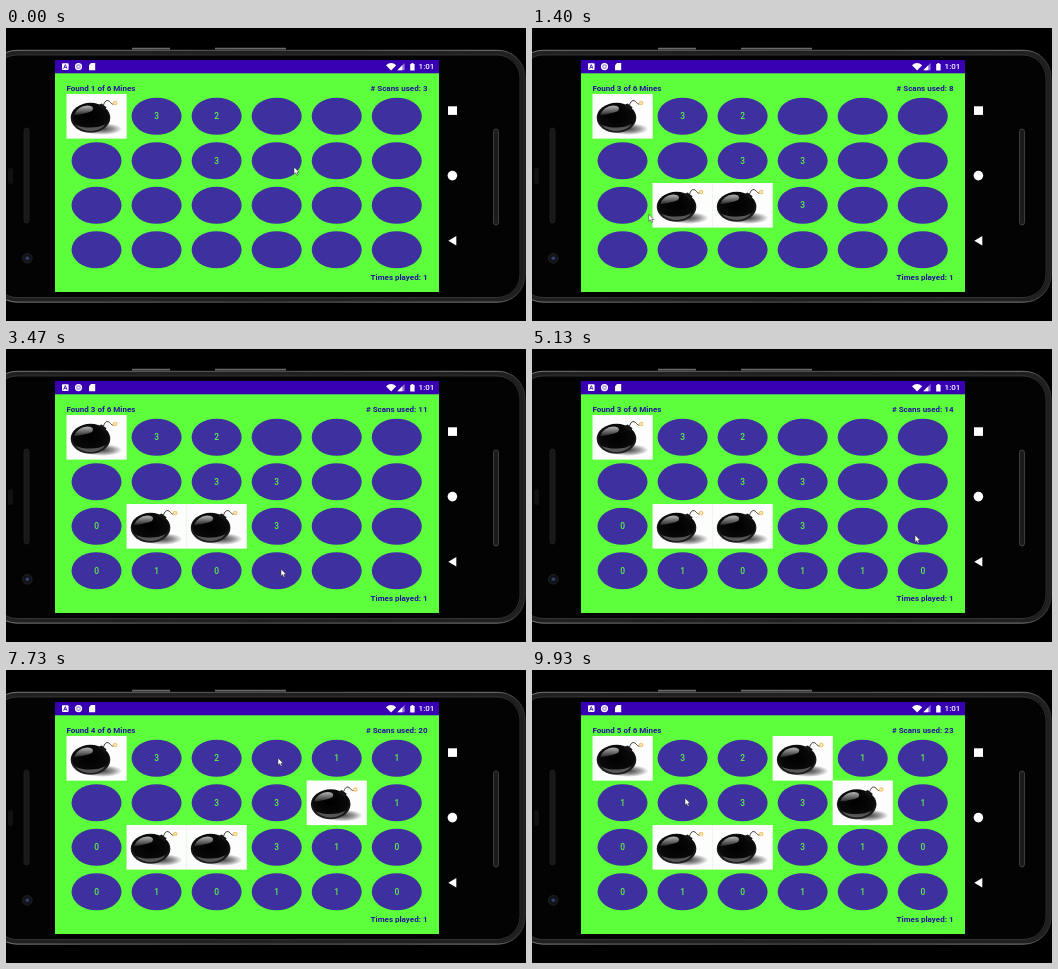
These frames come from a looping animation (520x293 px, 9.99 s). An HTML page:

```html
<!DOCTYPE html>
<html lang="en">
<head>
<meta charset="utf-8">
<title>Mine seeker</title>
<style>
  html, body { margin: 0; width: 100%; height: 100%; overflow: hidden; background: #000; }
  svg { display: block; width: 520px; height: 293px; }
  text { font-family: Roboto, sans-serif; font-size: 8px; }
  .label { font-weight: 700; fill: #26109c; }
  .count { font-weight: 500; font-size: 8.4px; fill: #5cf545; text-anchor: middle; }
  .end { text-anchor: end; }
</style>
</head>
<body>
<svg viewBox="0 0 520 293" xmlns="http://www.w3.org/2000/svg">
  <defs>
    <linearGradient id="rim">
      <stop offset="0" stop-color="#777"/>
      <stop offset=".5" stop-color="#555"/>
      <stop offset=".94" stop-color="#777"/>
      <stop offset="1" stop-color="#2a2a2a"/>
    </linearGradient>
    <radialGradient id="ball" cx=".5" cy=".45" r=".55">
      <stop offset="0" stop-color="#000"/>
      <stop offset=".8" stop-color="#0a0a0a"/>
      <stop offset="1" stop-color="#2a2a2a"/>
    </radialGradient>
    <linearGradient id="gloss" x1="0" y1="0" x2="0" y2="1">
      <stop offset="0" stop-color="#eee"/>
      <stop offset="1" stop-color="#333"/>
    </linearGradient>
    <radialGradient id="shade">
      <stop offset="0" stop-color="#444"/>
      <stop offset=".55" stop-color="#999"/>
      <stop offset="1" stop-color="#fff"/>
    </radialGradient>
    <g id="bomb">
      <rect width="60.2" height="44.6" fill="#fdfdfd"/>
      <ellipse cx="36" cy="35" rx="20" ry="6" fill="url(#shade)"/>
      <path d="M37 11C39 5 42 6 44 8.5S47 10 48 9" fill="none" stroke="#443c30" stroke-width="1"/>
      <circle cx="48.6" cy="9" r="2.3" fill="#f3c877"/>
      <circle cx="48.6" cy="9" r="1" fill="#fff3c0"/>
      <ellipse cx="24" cy="23.8" rx="19.8" ry="15" fill="url(#ball)"/>
      <path d="M31 11.5l4-2 5 3.8-2 3.5z" fill="#151515"/>
      <path d="M7.5 21Q11 12 21 11.5Q29 12 25.5 17Q18 20 7.5 21z" fill="url(#gloss)" opacity=".75"/>
      <path d="M9 31Q15 37 25 37Q35 36 39 30Q33 33.5 24 33.6Q15 33.5 9 31z" fill="#888" opacity=".6"/>
    </g>
  </defs>

  <rect width="520" height="293" fill="#000"/>
  <path d="M126 20.7h38M209 20.7h71" stroke="#6a6a6a" stroke-width="1.8"/>
  <g fill="none">
    <rect x="-14" y="24.5" width="531" height="247.5" rx="25" fill="#030303" stroke="#202020" stroke-width="5"/>
    <rect x="-16" y="22.3" width="535" height="251.8" rx="27" stroke="url(#rim)"/>
    <rect x="-12" y="27" width="526" height="242.5" rx="23" stroke="#3c3c3c" stroke-width=".8"/>
  </g>
  <rect x="2" y="140" width="5" height="16" rx="2" fill="#111"/>
  <rect x="18" y="100" width="5" height="95" rx="2.5" fill="#181818" stroke="#242424" stroke-width=".8"/>
  <rect x="487.5" y="101" width="5" height="96" rx="2.5" fill="#1c1c1c" stroke="#4a4a4a" stroke-width=".8"/>
  <circle cx="21.3" cy="230.3" r="4.8" fill="#11131a" stroke="#222"/>
  <circle cx="21.3" cy="230.3" r="1.8" fill="#34406e"/>

  <g fill="#fff">
    <rect x="442" y="78.3" width="9" height="8.6"/>
    <circle cx="446.4" cy="147.6" r="4.8"/>
    <path d="M442.3 212.8l8-4.7v9.4z"/>
  </g>

  <rect x="49" y="32" width="384" height="232" fill="#5dff3c"/>
  <rect x="49" y="32" width="384" height="13.3" fill="#3700b3"/>
  <g fill="#fff">
    <rect x="56" y="35.3" width="6.6" height="6.6" rx=".8"/>
    <path d="M57.6 40.7l1.7-4.1 1.7 4.1M58.2 39.4h2.2" fill="none" stroke="#3700b3" stroke-width=".8"/>
    <circle cx="72.5" cy="38.6" r="3" fill="#9c86dc" stroke="#fff" stroke-width="1.2"/>
    <circle cx="72.5" cy="38.6" r="1.2"/>
    <path d="M85 35h4.2v7.2h-6.2v-5z"/>
    <path d="M380 37.2Q385 33 390.2 37.2L385.1 42.6z"/>
    <path d="M391.3 42.3l7.3-7.3v7.3z" opacity=".45"/>
    <path d="M391.3 42.3l5-5v5z"/>
    <path d="M404.2 35.9h1.2v-.9h2v.9h1.2v6.5h-4.4z"/>
    <text x="412.6" y="41.4" font-weight="500">1:01</text>
  </g>
  <text class="label" id="found" x="60.5" y="63.1"></text>
  <text class="label end" id="scans" x="421.5" y="63.1"></text>
  <text class="label end" x="421.5" y="251.8">Times played: 1</text>
  <g id="board"></g>
  <path id="cursor" d="M0 0v7.2l1.7-1.5 1.2 2.6 1.2-.6-1.2-2.4h2.2z" fill="#fff" stroke="#222" stroke-width=".5"/>
</svg>
<script>
const LOOP = 9990, STEP = 1000 / 15;
const COLS = 6, ROWS = 4, LEFT = 60.5, TOP = 66, WIDE = 60.05, HIGH = 44.5;
const mines = [0, 3, 7, 10, 13, 14];
const opened = [0, 1, 2, 8];

// each click: tick, x, y; the cell follows from the position
const clicks = [
  [1, 288, 139], [7, 262, 189], [14, 211, 185], [20, 132, 190], [26, 92, 180],
  [36, 92, 230], [42, 148, 224], [48, 211, 224], [56, 275, 220], [63, 322, 224],
  [69, 382, 220], [80, 383, 186], [87, 334, 177], [92, 334, 133], [101, 386, 117],
  [107, 391, 90], [112, 334, 90], [120, 272, 88], [131, 97, 131], [139, 84, 188],
  [150, 153, 128]
];

const $ = id => document.getElementById(id);
const board = $('board');
const col = i => i % COLS;
const row = i => Math.floor(i / COLS);
const cellAt = (x, y) => Math.floor((y - TOP) / HIGH) * COLS + Math.floor((x - LEFT) / WIDE);

function add(tag, attrs) {
  const el = document.createElementNS('http://www.w3.org/2000/svg', tag);
  for (const key in attrs) el.setAttribute(key, attrs[key]);
  return board.appendChild(el);
}

const cells = Array.from({ length: COLS * ROWS }, (_, i) => {
  const left = LEFT + WIDE * col(i), top = TOP + HIGH * row(i);
  const x = left + WIDE / 2, y = top + HIGH / 2;
  return {
    oval: add('ellipse', { cx: x, cy: y, rx: 25, ry: 18.6, fill: '#3f309f' }),
    text: add('text', { class: 'count', x, y: y + 2.9 }),
    bomb: add('use', { href: '#bomb', x: left, y: top })
  };
});

// A scan counts the hidden mines in its row and column.
function play(tick) {
  const seen = {};
  const hidden = new Set(mines);
  let used = 0, scans = 0;
  const made = clicks.filter(c => c[0] <= tick).map(([, x, y]) => cellAt(x, y));
  for (const i of [...opened, ...made]) {
    scans = used++;
    if (hidden.delete(i)) {
      seen[i] = '';
      scans = used;
    } else {
      seen[i] = [...hidden].filter(m => col(m) === col(i) || row(m) === row(i)).length;
    }
  }
  return { seen, hidden, scans };
}

// After a click the pointer glides to the next one, slowing down.
function pointer(tick) {
  const n = clicks.findIndex(c => c[0] > tick);
  const [end, x1, y1] = clicks[n];
  const [start, x0, y0] = clicks[Math.max(0, n - 1)];
  const time = Math.min(end - start, Math.max(4, Math.hypot(x1 - x0, y1 - y0) / 16));
  const p = Math.min(1, Math.max(0, tick - start) / (time || 1));
  const e = Math.sin(p * Math.PI / 2);
  return [x0 + (x1 - x0) * e, y0 + (y1 - y0) * e];
}

function draw(ms) {
  const tick = Math.floor((ms % LOOP + 4) / STEP);
  const { seen, hidden, scans } = play(tick);
  cells.forEach(({ oval, text, bomb }, i) => {
    const blown = seen[i] === '';
    oval.style.display = blown ? 'none' : '';
    bomb.style.display = blown ? '' : 'none';
    text.textContent = seen[i] ?? '';
  });
  $('found').textContent = `Found ${mines.length - hidden.size} of ${mines.length} Mines`;
  $('scans').textContent = `# Scans used: ${scans}`;
  $('cursor').setAttribute('transform', `translate(${pointer(tick)})`);
}

const begin = performance.now();
function run() {
  draw(performance.now() - begin);
  requestAnimationFrame(run);
}
run();
</script>
</body>
</html>
```
